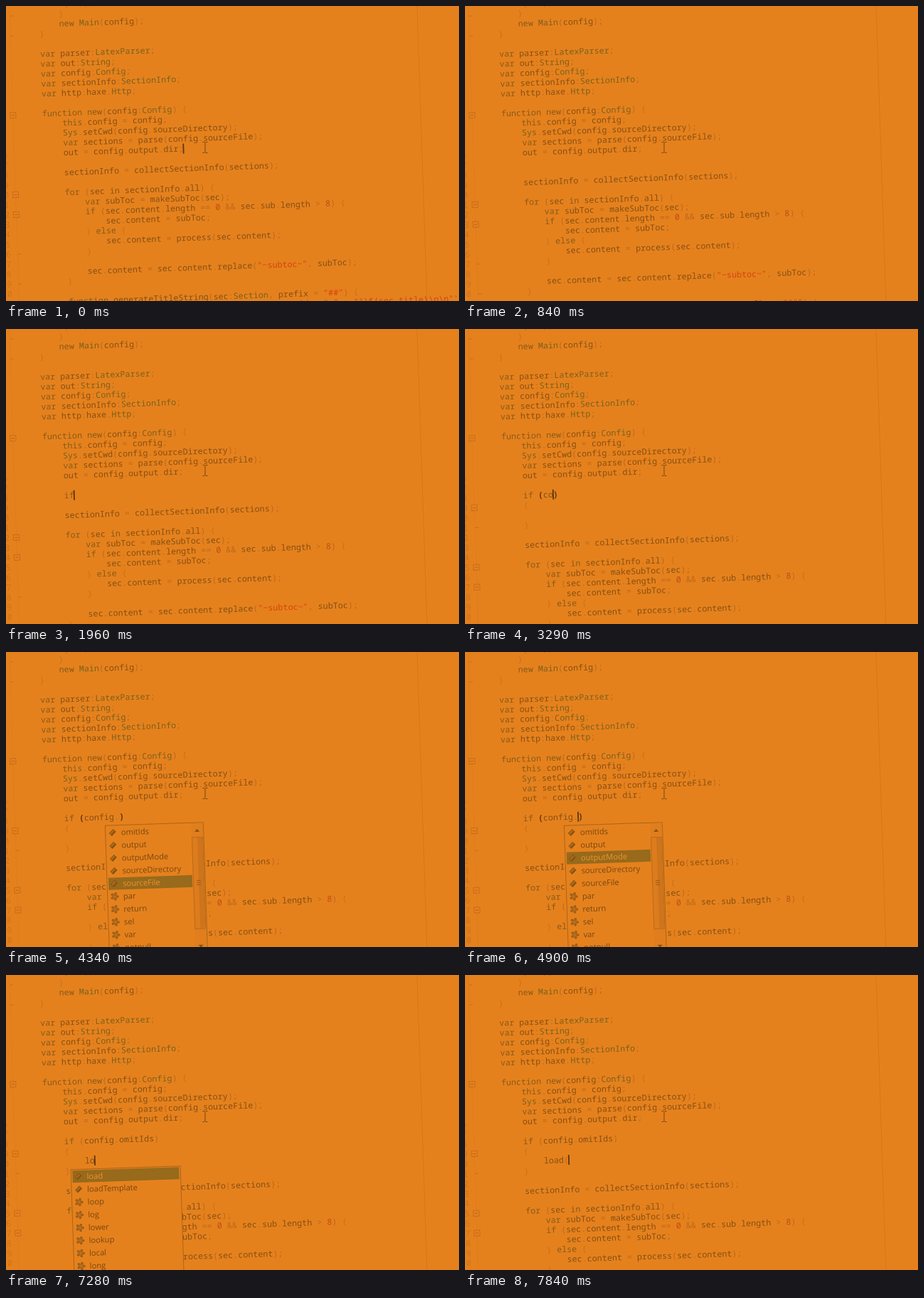
An HTML page for the animation above (8000 ms loop, 637 by 415 pixels).

```html
<!DOCTYPE html>
<html lang="en">
<head>
<meta charset="utf-8">
<title>Typing in a code editor</title>
<style>
  html, body { margin: 0; width: 100%; height: 100%; overflow: hidden; background: #e5811d; }
  svg { display: block; }
  text { white-space: pre; }
  .code { font: 11.72px "Noto Sans Mono", monospace; }
  .item { font: 11.2px "Open Sans", sans-serif; }
</style>
</head>
<body>
<svg id="stage" width="637" height="415" viewBox="0 0 637 415"></svg>
<script>
const LOOP = 8000, BLINK = 420;
const CHAR = 7.03, LINE = 13.97, ITEM = 18;
const BG = '#e5811d', INK = '#844f13', DARK = '#5c380d';
const COLORS = { string: '#d8420f', number: '#c04c14', keyword: '#875a19',
                 type: '#7a601c', brace: '#cc701c', punct: '#bd681b', name: INK };

const FIRST_ROW = -5, INSERT_ROW = 11;
const SOURCE = [
  '     (   );',
  '    }',
  '    new Main(config);',
  '}',
  '',
  'var parser:LatexParser;',
  'var out:String;',
  'var config:Config;',
  'var sectionInfo:SectionInfo;',
  'var http:haxe.Http;',
  '',
  'function new(config:Config) {',
  '    this.config = config;',
  '    Sys.setCwd(config.sourceDirectory);',
  '    var sections = parse(config.sourceFile);',
  '    out = config.output.dir;',
  '',
  '    sectionInfo = collectSectionInfo(sections);',
  '',
  '    for (sec in sectionInfo.all) {',
  '        var subToc = makeSubToc(sec);',
  '        if (sec.content.length == 0 && sec.sub.length > 8) {',
  '            sec.content = subToc;',
  '        } else {',
  '            sec.content = process(sec.content);',
  '        }',
  '',
  '        sec.content = sec.content.replace("~subtoc~", subToc);',
  '    }',
  '',
  '    function generateTitleString(sec:Section, prefix = "##") {',
  '        return \'$prefix ${sec.id.length > 0 ? sec.id + " " : ""}${sec.title}\\n\\n"\';'
];

// Completion popups: col is the column of the completed word.
const popup = (row, col, width, items, thumb = 0, members = 0) =>
  ({ row, col, width, items: items.split(' '), thumb, members });
const keywords = popup(12, 4, 119, 'case catch class else elseif enum for function getDisposer getEntity', 84);
const iWords = popup(12, 4, 119, 'if implements import in inline interface');
const ifWord = popup(12, 4, 119, 'if');
const conWords = popup(12, 8, 150, 'config collectSectionInfo continue Config content SectionInfo concat construct', 0, 1);
const fields = popup(12, 15, 138, 'omitIds output outputMode sourceDirectory sourceFile par return sel var notnull', 129, 5);
const loWords = popup(14, 8, 154, 'load loadTemplate loop log lower lookup local long', 0, 2);
const loadWords = popup(14, 8, 154, 'load loadTemplate', 0, 2);

const block = (condition, body = '') =>
  ['', `    if (${condition})`, '    {', body && '        ' + body, '    }'];

// [time, inserted lines, caret row, caret column, popup, selected item]
const STEPS = [
  [0, [], 10, 28],
  [280, [''], 11, 0],
  [420, [''], 11, 4],
  [1190, ['', ''], 12, 4],
  [1470, ['', ''], 12, 4, keywords, 0],
  [1610, ['', '    i'], 12, 5, iWords, 0],
  [1750, ['', '    if'], 12, 6, ifWord, 0],
  [1960, ['', '    if'], 12, 6],
  [2310, block(''), 12, 8],
  [2590, block(''), 12, 8],
  [3150, block('c'), 12, 9],
  [3290, block('co'), 12, 10],
  [3360, block('con'), 12, 11, conWords, 0],
  [3710, block('config'), 12, 14],
  [3850, block('config.'), 12, 15],
  [3920, block('config.'), 12, 15, fields, 4],
  [4690, block('config.'), 12, 15, fields, 3],
  [4900, block('config.'), 12, 15, fields, 2],
  [5040, block('config.'), 12, 15, fields, 1],
  [5180, block('config.'), 12, 15, fields, 0],
  [5320, block('config.omitIds'), 12, 22],
  [5460, block('config.omitIds'), 12, 22],
  [6300, block('config.omitIds'), 13, 5],
  [6370, block('config.omitIds'), 14, 8],
  [7210, block('config.omitIds', 'l'), 14, 9],
  [7280, block('config.omitIds', 'lo'), 14, 10, loWords, 0],
  [7350, block('config.omitIds', 'loa'), 14, 11, loadWords, 0],
  [7490, block('config.omitIds', 'load'), 14, 12, loadWords, 0],
  [7840, block('config.omitIds', 'load('), 14, 13]
];

function add(parent, tag, attrs = {}, content) {
  const node = document.createElementNS('http://www.w3.org/2000/svg', tag);
  for (const key in attrs) node.setAttribute(key, attrs[key]);
  if (content !== undefined) node.textContent = content;
  parent.appendChild(node);
  return node;
}
const box = (parent, x, y, width, height, fill, stroke = 'none') =>
  add(parent, 'rect', { x, y, width, height, fill, stroke });
const path = (parent, d, stroke, fill = 'none', width = 1) =>
  add(parent, 'path', { d, stroke, fill, 'stroke-width': width });

const TOKEN = /'[^']*'|"[^"]*"|\w+|[{}]|\s+|[^\w\s]/g;
function kind(token) {
  if (/^['"]/.test(token)) return 'string';
  if (/^\d/.test(token)) return 'number';
  if (/^(var|function|new|for|in|if|else|this|return)$/.test(token)) return 'keyword';
  if (/^[A-Z]/.test(token)) return 'type';
  if (/^[{}]$/.test(token)) return 'brace';
  return /^\w/.test(token) ? 'name' : 'punct';
}

function drawLine(parent, line, row, hot) {
  if (!line) return;
  const text = add(parent, 'text', { class: 'code', x: 0, y: row * LINE + 4 });
  for (const token of line.match(TOKEN)) {
    const span = add(text, 'tspan', { fill: COLORS[kind(token)] }, token);
    if (hot && hot.test(token)) {
      span.setAttribute('fill', DARK);
      span.setAttribute('font-weight', 'bold');
    }
  }
}

function drawGutter(parent, shift) {
  const g = add(parent, 'g', { transform: 'translate(0 1)' });
  const boxes = [6, 14 + shift, 16 + shift], ticks = [-4, -2, 20 + shift, 23 + shift];
  if (shift === 5) { boxes.push(13); ticks.push(15); }
  for (const row of boxes) {
    const y = row * LINE;
    box(g, -45, y - 4, 8, 8, BG, '#c56d1b');
    path(g, `M-43 ${y}h4`, '#b8641a');
  }
  for (const row of ticks) path(g, `M-41 ${row * LINE}h5`, '#c8701b');
  for (let row = 10; row < 26; row++) {
    add(g, 'text', { class: 'code', x: -54, y: row * LINE + 4, 'text-anchor': 'middle', fill: '#cd731c' },
        (row + 6) % 10);
  }
}

function drawIcon(parent, x, y, member) {
  const g = add(parent, 'g', { transform: `translate(${x} ${y})` });
  if (member) {
    path(g, 'M-5 1L1 -5L5 -1L-1 5Z', 'none', '#84500f');
    path(g, 'M-4 1L1 -4L3 -2L-2 3Z', 'none', '#aa6a1c');
  } else {
    for (let i = 0; i < 5; i++) {
      const angle = i * Math.PI * 0.4 - 1.2;
      add(g, 'circle', { cx: 4.2 * Math.cos(angle), cy: 4.2 * Math.sin(angle), r: 1.8, fill: '#9a5c16' });
    }
    add(g, 'circle', { r: 3.8, fill: '#ab661a' });
    add(g, 'circle', { r: 1.2, fill: '#cf771d' });
  }
}

function drawPopup(parent, menu, selected) {
  const { row, col, width, items, thumb, members } = menu;
  const height = items.length * ITEM + 3;
  const g = add(parent, 'g', { transform: `translate(${col * CHAR - 20} ${row * LINE + 12})` });
  box(g, 0, 0, width, height, BG, '#a9651a');
  items.forEach((name, i) => {
    const y = 1.5 + i * ITEM, active = i === selected;
    if (active) box(g, 2, y, width - (thumb ? 20 : 4), ITEM - 1, '#976a1c');
    drawIcon(g, 10, y + 8.5, i < members);
    add(g, 'text', { class: 'item', x: 22, y: y + 12.5, fill: active ? '#f0922a' : '#774711' }, name);
  });
  if (!thumb) return;
  const x = width - 17, mid = 20 + thumb / 2;
  box(g, x, 1, 16, height - 2, '#e07e1d');
  box(g, x + 0.5, 20.5, 15, thumb, '#dd7c1d', '#b96c1b');
  box(g, x + 8, 21, 7, thumb - 1, '#cd741c');
  path(g, `M${x + 5} ${mid - 3}h6m-6 3h6m-6 3h6`, '#9a5c16');
  path(g, `M${x + 4.5} 13l3.5 -4l3.5 4z`, 'none', '#84500f');
  path(g, `M${x + 4.5} ${height - 11}l3.5 4l3.5 -4z`, 'none', '#84500f');
}

const stage = document.getElementById('stage');
box(stage, 0, 0, 637, 415, BG);
const screen = add(stage, 'g', { transform: 'translate(48 67.6) rotate(-1.92)' });
path(screen, 'M532 -90V390', '#d4771c');
path(screen, 'M-41 -90V390', '#de7d1d');
const editor = add(screen, 'g');
const caret = box(screen, 0, 0, 1.8, 14, DARK);
const overlay = add(screen, 'g');
path(stage, 'M276.5 191.5h2.5l1 1l1 -1h2.5M280 192.5v13M276.5 206.5h2.5l1 -1l1 1h2.5', '#77460f');

let shown = null;
function drawStep(step) {
  const [, inserted, row, col, menu, selected] = step;
  editor.replaceChildren();
  overlay.replaceChildren();
  drawGutter(editor, inserted.length);
  const lines = SOURCE.slice();
  lines.splice(INSERT_ROW - FIRST_ROW, 0, ...inserted);
  lines.forEach((line, i) => {
    const r = i + FIRST_ROW;
    const hot = row === 12 && r === 12 ? /[()]/
              : row === 13 && r >= 13 && r <= 15 ? /[{}]/ : null;
    drawLine(editor, line, r, hot);
  });
  caret.setAttribute('x', col * CHAR - 0.8);
  caret.setAttribute('y', row * LINE - 7);
  if (menu) drawPopup(overlay, menu, selected);
}

function render(now) {
  const t = now % LOOP;
  const step = STEPS.findLast(s => s[0] <= t);
  if (step !== shown) drawStep(shown = step);
  caret.setAttribute('visibility', t - step[0] < BLINK ? 'visible' : 'hidden');
}

const start = performance.now();
function tick() {
  render(performance.now() - start);
  requestAnimationFrame(tick);
}
tick();
</script>
</body>
</html>
```
